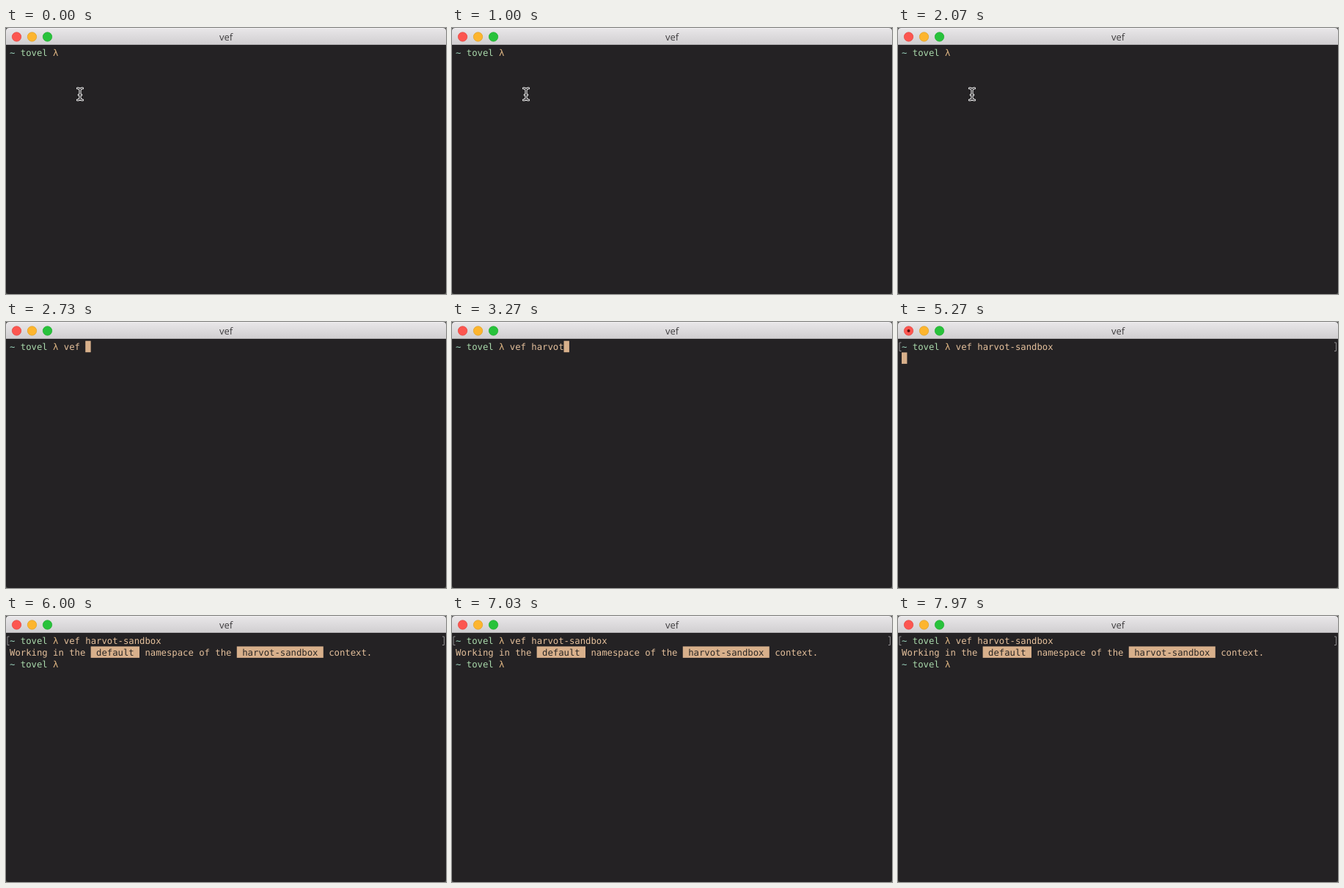
These frames come from a looping animation (600 px wide and 362 px high, 8 s). An HTML page:

```html
<!DOCTYPE html>
<html lang="en">
<head>
<meta charset="utf-8">
<title>Terminal</title>
<style>
  html, body { margin: 0; width: 100%; height: 100%; overflow: hidden; background: #242224; }
  svg { display: block; width: 600px; height: 362px; }
  text { white-space: pre; text-rendering: geometricPrecision; }
  .mono { font: 12.25px "DejaVu Sans Mono", monospace; }
  .title { font: 13px "Open Sans", sans-serif; fill: #3d3b3d; text-anchor: middle; }
</style>
</head>
<body>
<svg id="stage" viewBox="0 0 600 362" xmlns="http://www.w3.org/2000/svg">
  <defs>
    <linearGradient id="bar" x1="0" y1="0" x2="0" y2="1">
      <stop offset="0" stop-color="#e9e7e9"/>
      <stop offset="1" stop-color="#d0ced0"/>
    </linearGradient>
  </defs>
  <rect width="600" height="362" fill="#4b4d49"/>
  <rect width="600" height="362" rx="4" fill="#242224"/>
  <path d="M0 23V4Q0 0 4 0H596Q600 0 600 4V23Z" fill="url(#bar)"/>
  <path d="M4 .5H596" stroke="#f3f1f3"/>
  <path d="M0 22.5H600" stroke="#b5b3b5"/>
  <g stroke-width=".7">
    <circle cx="14.5" cy="12" r="6.2" fill="#fc5650" stroke="#e2463f"/>
    <circle cx="35.5" cy="12" r="6.2" fill="#fdb52e" stroke="#dfa023"/>
    <circle cx="56.5" cy="12" r="6.2" fill="#28c23b" stroke="#1fab2f"/>
  </g>
  <circle id="dot" cx="14.5" cy="12" r="2" fill="#5a0a08"/>
  <text class="title" x="300" y="17">vef</text>
  <g id="lines" class="mono"></g>
  <path id="brackets" d="M4.5 28H2V39.5H4.5M595 28H597.5V39.5H595" fill="none" stroke="#8f8d8f"/>
  <rect id="cursor" width="7.4" height="15.5" fill="#d8b08b"/>
  <g id="pointer" fill="none" stroke-linecap="round">
    <path id="beam" stroke="#f4f4f4" stroke-width="3.2"
      d="M97.5 82Q101 82 101 85V95Q101 98 97.5 98M104.5 82Q101 82 101 85M101 95Q101 98 104.5 98M99.3 91H102.7"/>
    <use href="#beam" id="core"/>
  </g>
</svg>
<script>
const NS = "http://www.w3.org/2000/svg";
const LOOP = 8000, CELL = 7.375, LEFT = 5, ROW = 15.7;
const TAN = "#e4c09c", GREEN = "#a9d9ab", TEAL = "#9bd3bd", DARK = "#2a2624", FILL = "#d8b08b";
const SENT = 4870, OUTPUT = 5500;

const command = "vef harvot-sandbox";
const keys = [2400, 2500, 2600, 2730, 2870, 2930, 3030, 3100, 3170, 3270, 3430,
              4130, 4230, 4330, 4470, 4530, 4600, 4670];

const $ = id => document.getElementById(id);
const colX = col => LEFT + col * CELL;
const rowY = row => 25.7 + row * ROW;

function add(parent, tag, attrs, content = "") {
  const el = document.createElementNS(NS, tag);
  for (const k in attrs) el.setAttribute(k, attrs[k]);
  el.textContent = content;
  parent.appendChild(el);
  return el;
}

function write(parent, col, row, str, fill = TAN) {
  return add(parent, "text", { x: colX(col), y: rowY(row) + 12.4, fill }, str);
}

function badge(parent, col, row, str) {
  add(parent, "rect", { x: colX(col), y: rowY(row), width: (str.length + 2) * CELL, height: 15.5, fill: FILL });
  write(parent, col + 1, row, str, DARK);
}

function prompt(parent, row) {
  write(parent, 0, row, "~", TEAL);
  write(parent, 2, row, "tovel", GREEN);
  write(parent, 8, row, "λ", "#dfb683");
}

const lines = $("lines");
prompt(lines, 0);
const typed = write(lines, 10, 0, "");
const output = add(lines, "g", {});
write(output, 0, 1, "Working in the");
badge(output, 15, 1, "default");
write(output, 25, 1, "namespace of the");
badge(output, 42, 1, "harvot-sandbox");
write(output, 59, 1, "context.");
prompt(output, 2);

// thin dark core over the white beam
const core = $("beam").cloneNode();
core.removeAttribute("id");
core.setAttribute("stroke", "#1c1a1c");
core.setAttribute("stroke-width", "1.1");
$("core").replaceWith(core);

function show(el, on) {
  el.setAttribute("visibility", on ? "visible" : "hidden");
}

function cursorOn(t) {
  if (t < keys[0]) return (t + 870) % 1000 < 500;
  if (t < OUTPUT) return true;
  return (t - 5470) % 1000 < 500;
}

function draw(t) {
  const count = keys.filter(k => k <= t).length;
  const row = t >= OUTPUT ? 2 : t >= SENT ? 1 : 0;
  const col = row === 2 ? 10 : row === 1 ? 0 : 10 + count;
  typed.textContent = command.slice(0, count);
  show(output, t >= OUTPUT);
  show($("brackets"), t >= SENT);
  show($("dot"), t >= 5000 && t < 6000);
  show($("pointer"), t < keys[0]);
  $("cursor").setAttribute("x", colX(col));
  $("cursor").setAttribute("y", rowY(row));
  show($("cursor"), cursorOn(t));
}

const start = performance.now();
function frame() {
  draw((performance.now() - start) % LOOP);
  requestAnimationFrame(frame);
}
draw(0);
requestAnimationFrame(frame);
</script>
</body>
</html>
```
